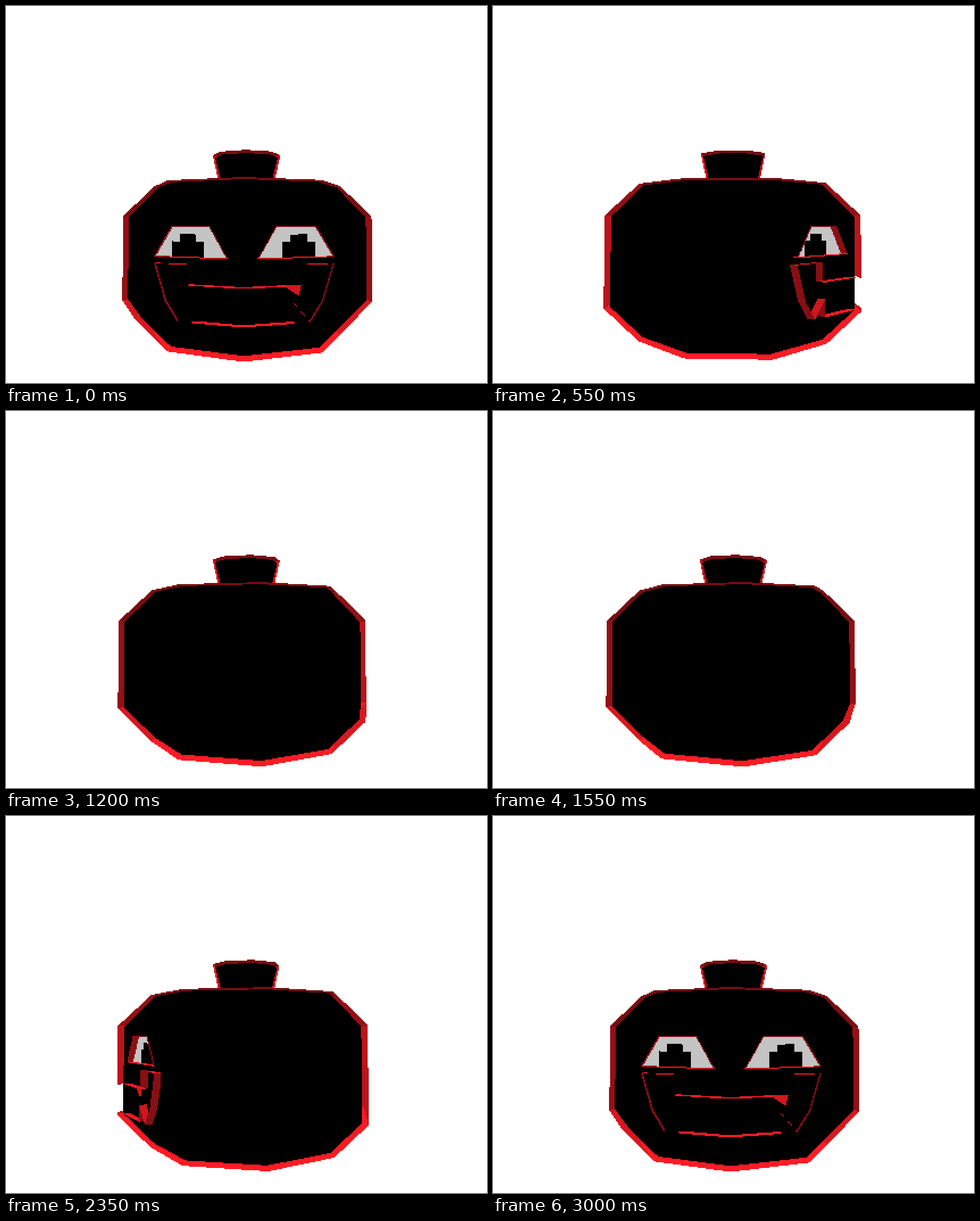
An HTML page with a canvas that plays this animation: 846x662 px, repeating every 3050 ms.

```html
<!DOCTYPE html>
<html lang="en">
<head>
<meta charset="utf-8">
<title>Turning head</title>
<style>
  html, body { margin: 0; width: 100%; height: 100%; overflow: hidden; background: #fff; }
  canvas { display: block; width: 846px; height: 662px; image-rendering: pixelated; }
</style>
</head>
<body>
<canvas id="stage" width="423" height="331"></canvas>
<script>
const ctx = document.getElementById('stage').getContext('2d');
const CX = 423, HORIZON = 380, DIST = 797, RAD = Math.PI / 180;
const STEP = 50, LOOP = 3050;
const FACE_R = 209.5, DIAG = Math.SQRT1_2, EYE_DEPTH = 9, MOUTH_DEPTH = 11;
const WHOLE = [-1e4, 1e4];

// Rings run from top to bottom as [radius, height]; shades are [front/back, sides].
const body = {
  hull: [[163.5, -63.5], [218.5, -11], [220, 137.5], [165, 194.3]],
  core: [[157, -61], [208.5, -9], [210, 135.5], [158.5, 188]],
  shades: [[148, 120], [187, 148], [244, 215]],
  caps: [118, 251]
};
const stem = {
  hull: [[59.5, -118], [47.5, -63.5]],
  core: [[55, -113.5], [42, -61]],
  shades: [[215, 195]],
  caps: [118, 118]
};

// Outlines on half of the face as [across, height]: 0 is the cheek edge, 1 the middle.
const eye = [[.325, 6], [.696, 6], [.865, 47.8], [.147, 47.6]];
const pupil = [[.32, 47.7], [.32, 26.5], [.4, 26.5], [.4, 16.5],
  [.562, 16.5], [.562, 26.5], [.638, 26.5], [.638, 47.7]];
const eyeShades = [125, 140, 245, 150];
const mouth = [[.14, 58], [.495, 58], [.495, 86], [1, 85.5], [1, 135.6],
  [.53, 136.5], [.53, 111], [.378, 137.5], [.25, 109.5]];
const mouthShades = [240, 135, 240, 0, 245, 135, 0, 205, 135, 135]
  .filter((_, i) => i !== 6);
// 1 or -1: the wall shows from one side only; 0: from both.
const mouthFacing = [0, 1, 0, 0, 0, -1, 0, 0, 0];
const lips = [2, 4];

let cos = 1, sin = 0;

const red = c => `rgb(${c},${Math.round(c * .11)},${Math.round(c * .145)})`;

function project(x, y, z) {
  const scale = 1 / (1 - (z * cos - x * sin) / DIST);
  return [CX + (x * cos + z * sin) * scale, HORIZON + y * scale];
}

function onRing([r, y], k) {
  const a = k * 45 * RAD;
  return project(r * Math.sin(a), y, r * Math.cos(a));
}

function onFace(side, [u, y], depth = 0) {
  return project(side * FACE_R * DIAG * (1 - u), y,
    FACE_R * (DIAG + (1 - DIAG) * u) - depth);
}

function area(pts) {
  return pts.reduce((sum, [x, y], i) => {
    const [nx, ny] = pts[(i + 1) % pts.length];
    return sum + x * ny - nx * y;
  }, 0);
}

// Hard-edged polygon fill on the coarse grid.
function fill(pts, color, [lo, hi] = WHOLE) {
  ctx.fillStyle = color;
  const p = pts.map(([x, y]) => [x / 2, y / 2]);
  const ys = p.map(q => q[1]);
  const last = Math.ceil(Math.max(...ys));
  for (let row = Math.floor(Math.min(...ys)); row <= last; row++) {
    const y = row + .5, hits = [];
    p.forEach(([x0, y0], i) => {
      const [x1, y1] = p[(i + 1) % p.length];
      if ((y0 <= y) !== (y1 <= y)) hits.push(x0 + (x1 - x0) * (y - y0) / (y1 - y0));
    });
    hits.sort((a, b) => a - b);
    for (let i = 0; i + 1 < hits.length; i += 2) {
      const from = Math.ceil(Math.max(hits[i], lo / 2) - .5);
      const to = Math.ceil(Math.min(hits[i + 1], hi / 2) - .5);
      if (to > from) ctx.fillRect(from, row, to - from, 1);
    }
  }
}

function line(a, b, color, [lo, hi]) {
  ctx.fillStyle = color;
  const dx = (b[0] - a[0]) / 2, dy = (b[1] - a[1]) / 2;
  const n = Math.max(1, Math.ceil(Math.max(Math.abs(dx), Math.abs(dy))));
  for (let i = 0; i <= n; i++) {
    const x = a[0] / 2 + dx * i / n, y = a[1] / 2 + dy * i / n;
    if (x * 2 >= lo && x * 2 <= hi) ctx.fillRect(Math.floor(x), Math.floor(y), 1, 1);
  }
}

const cap = ring => Array.from({ length: 8 }, (_, k) => onRing(ring, k));

function facets(rings, draw) {
  for (let i = 0; i + 1 < rings.length; i++) {
    for (let k = 0; k < 8; k++) {
      draw([onRing(rings[i], k), onRing(rings[i], k + 1),
        onRing(rings[i + 1], k + 1), onRing(rings[i + 1], k)], i, k);
    }
  }
}

// The far sides of the hull form the red rim around the black core.
function drawHull({ hull, shades, caps }) {
  fill(cap(hull[0]), red(caps[0]));
  fill(cap(hull[hull.length - 1]), red(caps[1]));
  facets(hull, (quad, i, k) => {
    const lengthwise = Math.abs(Math.cos((k + .5) * 45 * RAD)) > .7;
    if (area(quad) < 0) fill(quad, red(shades[i][lengthwise ? 0 : 1]));
  });
}

function drawCore({ core }) {
  fill(cap(core[0]), '#000');
  fill(cap(core[core.length - 1]), '#000');
  facets(core, quad => fill(quad, '#000'));
}

// The mouth leaves a gap in the rim when seen from the side.
function drawGap() {
  const r = 221;
  for (const side of [-1, 1]) {
    const at = (u, y) => project(side * r * DIAG * (1 - u), y, r * (DIAG + (1 - DIAG) * u));
    const quad = [at(.5, 88), at(1, 88), at(1, 134), at(.5, 134)];
    if (area(quad) * -side < 0) fill(quad, '#fff');
  }
}

function drawWall(side, a, b, depth, shade, facing, clip) {
  const quad = [onFace(side, a), onFace(side, b),
    onFace(side, b, depth), onFace(side, a, depth)];
  if (!facing || area(quad) * -side * facing > 0) fill(quad, red(shade), clip);
}

function drawHalf(side) {
  const panel = [[0, 0], [1, 0], [1, 135], [0, 135]].map(p => onFace(side, p));
  if (area(panel) * -side <= 0) return;
  const xs = panel.map(p => p[0]);
  const clip = [Math.min(...xs), Math.max(...xs)];
  const next = (list, i) => list[(i + 1) % list.length];

  fill(eye.map(p => onFace(side, p)), '#c4c4c4', clip);
  fill(pupil.map(p => onFace(side, p, EYE_DEPTH)), '#000', clip);
  eye.forEach((p, i) => {
    const q = next(eye, i);
    drawWall(side, p, q, EYE_DEPTH, eyeShades[i], 1, clip);
    line(onFace(side, p), onFace(side, q), red(eyeShades[i]), clip);
  });

  mouth.forEach((p, i) => {
    if (!mouthShades[i]) return;
    const q = next(mouth, i);
    drawWall(side, p, q, MOUTH_DEPTH, mouthShades[i], mouthFacing[i], clip);
    if (lips.includes(i)) line(onFace(side, p), onFace(side, q), red(mouthShades[i]), clip);
  });

  if (side > 0 && sin < .4) {
    fill([[.63, 85], [.465, 85], [.49, 100]].map(p => onFace(side, p)), red(210), clip);
  }
}

function render(now) {
  const turn = (Math.floor(now % LOOP / STEP) * 6 - 1.45) * RAD;
  cos = Math.cos(turn);
  sin = Math.sin(turn);
  ctx.fillStyle = '#fff';
  ctx.fillRect(0, 0, 423, 331);
  drawHull(stem);
  drawCore(stem);
  drawHull(body);
  drawGap();
  drawCore(body);
  drawHalf(-1);
  drawHalf(1);
}

const start = performance.now();
function tick() {
  render(performance.now() - start);
  requestAnimationFrame(tick);
}
tick();
</script>
</body>
</html>
```
